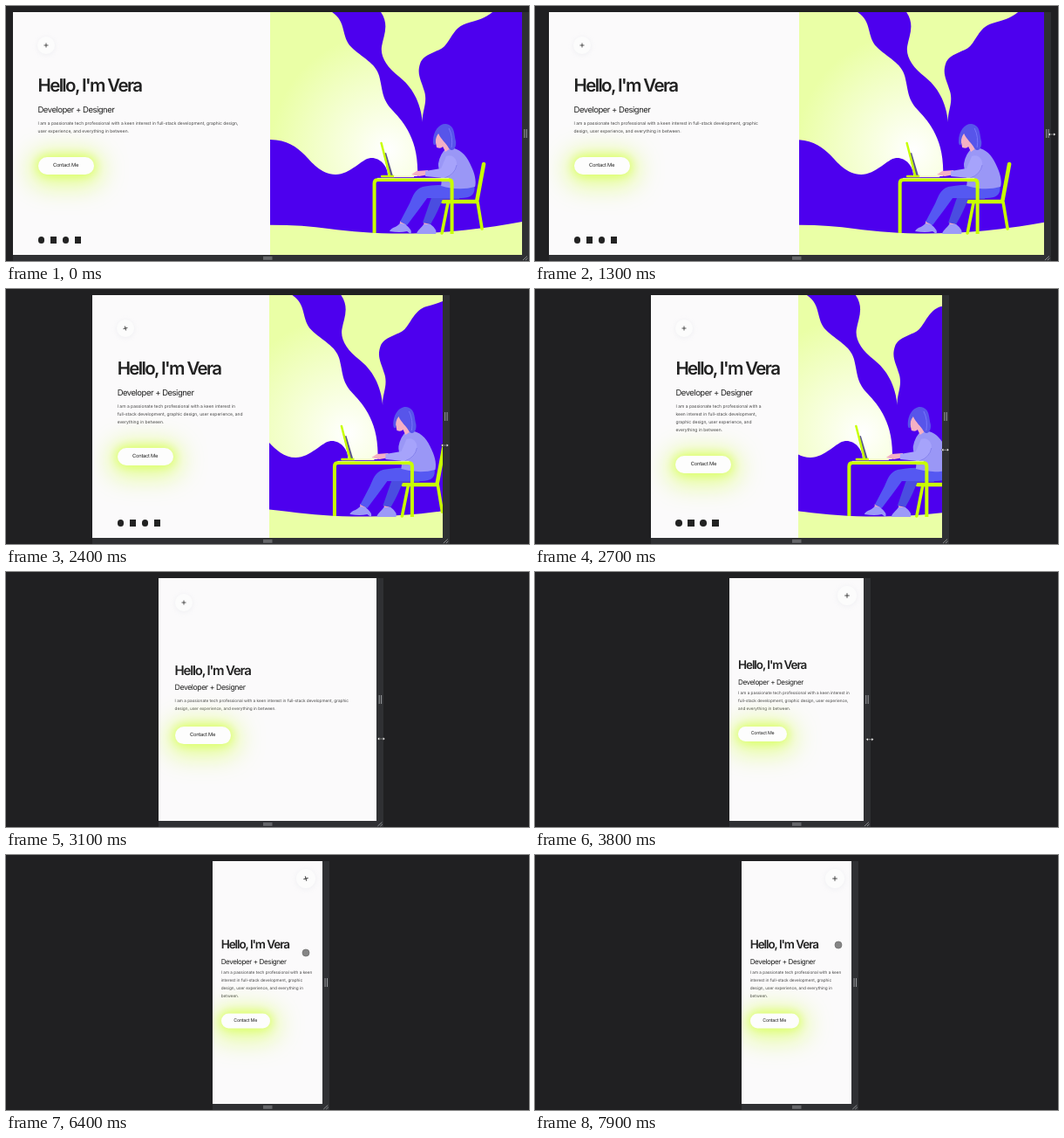
These frames come from a looping animation (600x292 px, 8 s). An HTML page:

```html
<!DOCTYPE html>
<html lang="en">
<head>
<meta charset="utf-8">
<title>Responsive portfolio</title>
<style>
html, body { margin: 0; width: 100%; height: 100%; overflow: hidden; background: #202022; }
body { position: relative; font-family: Inter, "Open Sans", sans-serif; color: #222; text-rendering: geometricPrecision; }
div, svg, i { position: absolute; display: block; }
#frame { top: 7px; height: 285px; background: #2f3033; }
#page { top: 7px; height: 278px; overflow: hidden; background: #fbfafb; }
#text { top: 74px; left: 28.5px; }
h1, h2, p { margin: 0; white-space: nowrap; }
h1 { font-size: 20.5px; font-weight: 600; line-height: 20px; letter-spacing: -.08em; }
h2 { font-size: 9.5px; font-weight: 400; line-height: 10px; letter-spacing: -.052em; margin: 14px 0 5.6px; }
p { font-size: 4.98px; line-height: 9px; color: #444; white-space: normal; }
p span { white-space: nowrap; }
#button { position: relative; width: 64px; height: 20px; margin-top: 24.4px; border-radius: 10px; background: #fdfdfd;
  font-size: 5.8px; line-height: 20px; letter-spacing: -.045em; text-align: center;
  box-shadow: 0 0 12px 1px #d9ff5c, 0 4px 28px 9px #deff7acc; }
#plus { left: 28px; top: 28px; width: 20px; height: 20px; border-radius: 50%; background: #fcfcfc; box-shadow: 0 1px 6px #d8dce455; }
#plus svg { left: 0; top: 0; width: 100%; height: 100%; }
#icons i { top: 257.3px; width: 7.6px; height: 7.6px; background: #222; }
#icons i:nth-child(odd) { border-radius: 50%; }
#art { top: 0; height: 278px; overflow: hidden; }

.mid #text, .small #text { transform: translateY(-50%); }
.mid #text { top: 143.4px; left: 19px; }
.mid h1 { font-size: 15px; }
.mid h2 { font-size: 8.75px; margin-top: 5px; }
.mid p, .small p { font-size: 4.69px; }
.mid #button, .small #button { margin-top: 15.3px; }
.mid #plus { left: 19px; top: 18px; }
.small #text { top: 138.5px; left: 10px; }
.small h1 { font-size: 13.5px; }
.small h2 { font-size: 8.1px; margin: 4px 0 4.6px; }
.small #button { width: 56px; height: 17px; line-height: 17px; font-size: 5.3px; }
.small #plus { left: auto; right: 8px; top: 9px; width: 22px; height: 22px; }
.mid #icons, .small #icons, .mid #art, .small #art { display: none; }
#overlay { left: 0; top: 0; }
</style>
</head>
<body>
<div id="frame"></div>
<div id="page">
  <svg id="art">
    <defs>
      <radialGradient id="glow" gradientUnits="userSpaceOnUse" cx="438" cy="165" r="135">
        <stop offset="0" stop-color="#fff"/><stop offset=".25" stop-color="#faffe8"/><stop offset="1" stop-color="#eaffa6"/>
      </radialGradient>
    </defs>
    <rect width="300" height="278" fill="#4d00ee"/>
    <g id="scene">
      <!-- steam and floor -->
      <path fill="url(#glow)" d="M200 7H374C391 18 384 35 396 47S424 65 428 80S431 106 442 118S474 150 472 195H438C438 182 428 173 418 174S395 193 378 193S350 178 342 170S322 153 303 153L200 160Z"/>
      <path fill="#eaffa6" d="M430 7C440 22 433 34 431 46S437 70 451 81S476 109 478 135C476 122 484 112 480 98S471 78 475 66S496 53 503 46S514 24 528 20S549 14 558 7Z"/>
      <path fill="#eaffa6" d="M200 256Q310 246 370 255C430 263 500 264 592 247L700 235V300H200Z"/>
      <!-- chair -->
      <g fill="none" stroke="#c8ff00" stroke-width="4.500" stroke-linecap="round" stroke-linejoin="round">
        <path d="M548 181L540 224H501"/>
        <path d="M541 225L546 255M507 225L500 260" stroke-width="3.600"/>
      </g>
      <!-- legs and shoes -->
      <path fill="#f0a9c4" d="M452 246l7 3-2 7h-6zM479 247h7v8h-6z"/>
      <path fill="#4a4de0" d="M520 210C500 209 490 212 487 222L478 248L487 250C494 238 498 228 501 221H520Z"/>
      <path fill="#5558f2" d="M537 205C515 204 490 204 478 207C469 210 467 217 463 226L452 247L460 251C468 240 476 230 483 220H522C534 220 539 215 537 205Z"/>
      <path fill="#9c9af8" d="M452 249C447 254 441 254 440 258Q452 260 460 258L464 261Q467 257 458 250ZM479 250C477 254 471 257 471 261H493Q495 256 487 250Z"/>
      <!-- torso, head and arm -->
      <path fill="#9a97f6" d="M505 163C517 160 527 169 532 180C537 190 540 199 538 207Q520 212 499 206C501 195 495 187 496 180Q498 169 505 163Z"/>
      <path fill="#f4b0c4" d="M495 145Q491 153 493 157L494 162Q499 164 501 161L504 167L511 162L509 148Z"/>
      <path fill="#5755ea" d="M490 157C489 142 499 132 508 136C515 139 514 148 516 155C517 163 512 168 508 163C505 157 499 153 496 146Q492 151 493 158Q491 161 490 157Z"/>
      <path d="M508 140Q513 150 511 162" fill="none" stroke="#7775fb"/>
      <path fill="#f4b0c4" d="M484 188L471 189L465 193L474 195L485 193Z"/>
      <path fill="#a6a3fb" d="M505 172C512 169 518 175 517 183C516 190 510 196 502 197L481 195L481 189L499 186Z"/>
      <path d="M517 182Q515 193 503 197" fill="none" stroke="#7775e6" stroke-width=".7"/>
      <!-- laptop and table -->
      <path fill="#5b568e" d="M433 169L436 168L444 195H439Z"/>
      <path d="M430.500 157L440 194M431 195H445" fill="none" stroke="#c8ff00" stroke-width="2.500" stroke-linecap="round"/>
      <path d="M445 195H468" stroke="#f5ffd0" stroke-width="2"/>
      <path d="M422.500 260V203Q422.500 199 426.500 199H507.500Q511.500 199 511.500 203V261" fill="none" stroke="#c8ff00" stroke-width="4"/>
      <path d="M426 197.300H508" stroke="#eeffa8" stroke-width=".8"/>
    </g>
  </svg>
  <div id="plus"><svg viewBox="-10 -10 20 20"><path id="cross" d="M-2.500 0H2.500M0-2.500V2.500" stroke="#222" stroke-width=".75"/></svg></div>
  <div id="text">
    <h1>Hello, I'm Vera</h1>
    <h2>Developer + Designer</h2>
    <p>I am a passionate tech professional with a keen interest in <span>full-stack</span> development, graphic design, user experience, and everything in between.</p>
    <div id="button">Contact Me</div>
  </div>
  <div id="icons"><i style="left:28.5px"></i><i style="left:42.5px"></i><i style="left:56.5px"></i><i style="left:70.5px"></i></div>
</div>
<svg id="overlay" width="600" height="292">
  <path d="M295 287.800H305.500M295 289.800H305.500" stroke="#999b9e"/>
  <g id="grip" stroke="#999b9e"><path d="M-1.200 141V151M1.200 141V151"/><path d="M-3 291L2 286.500M0 291L2.500 288.800" stroke-width=".9"/></g>
  <path id="resize" d="M-4.500 0L-2-2V-.5H2V-2L4.500 0L2 2V.5H-2V2Z" fill="#fff" stroke="#111" stroke-width=".5"/>
  <circle id="touch" r="4" fill="#858585" stroke="#6c6c6c" stroke-width=".7"/>
</svg>
<script>
const $ = id => document.getElementById(id);
const LOOP = 8000;

// keys: [time, value] pairs, joined by straight lines
function track(keys, t) {
  const i = keys.findIndex(k => k[0] > t);
  if (i === 0) return keys[0][1];
  if (i < 0) return keys[keys.length - 1][1];
  const [t0, a] = keys[i - 1], [t1, b] = keys[i];
  return a + (b - a) * (t - t0) / (t1 - t0);
}
const ease = x => x < 0 ? 0 : x > 1 ? 1 : x * x * (3 - 2 * x);

const halfWidth = [[700, 292], [1300, 284], [1600, 274], [2000, 252], [2400, 201], [2500, 188],
  [3100, 125.5], [3400, 96], [3800, 77], [4300, 65], [4700, 63.3]];
const gap = [[800, 4], [1300, 9], [2000, 7], [2400, 2.5], [3100, 5], [4900, 10.5]];
const dragY = [[800, 146], [1300, 147], [2000, 158], [2400, 179], [3100, 191], [4900, 193]];
const touchX = [[5000, 372], [5400, 346], [5800, 346], [6400, 344], [7200, 348]];
const touchY = [[5000, 193], [5400, 186], [5800, 151], [6400, 112], [7200, 103]];

function place(id, x, y) { $(id).setAttribute("transform", `translate(${x} ${y})`); }
function span(id, left, width) {
  $(id).style.left = left + "px";
  $(id).style.width = width + "px";
}

function draw(t) {
  const half = track(halfWidth, t), left = 300 - half, right = 300 + half;
  const mode = half < 99 ? "small" : half < 158 ? "mid" : "";
  const pad = { small: 10, mid: 19 }[mode] || 29.25;
  const split = half * 1.01;

  $("page").className = mode;
  span("page", left, half * 2);
  span("frame", left, half * 2 + 8);
  $("text").style.width = (mode ? half * 2 : split) - pad * 2 + "px";
  span("art", split, half * 2 - split);
  place("scene", (half - 292) / 2 - left - split, -7);
  $("cross").setAttribute("transform", `rotate(${90 * ease((t % 4000 - 1500) / 1200)})`);

  place("grip", right + 4, 0);
  place("resize", right + track(gap, t), track(dragY, t));
  place("touch", track(touchX, t), track(touchY, t));
  $("resize").style.display = t >= 800 && t < 5000 ? "" : "none";
  $("touch").style.display = t >= 5000 ? "" : "none";
}

const start = performance.now();
function tick() {
  draw((performance.now() - start) % LOOP);
  requestAnimationFrame(tick);
}
tick();
</script>
</body>
</html>
```
